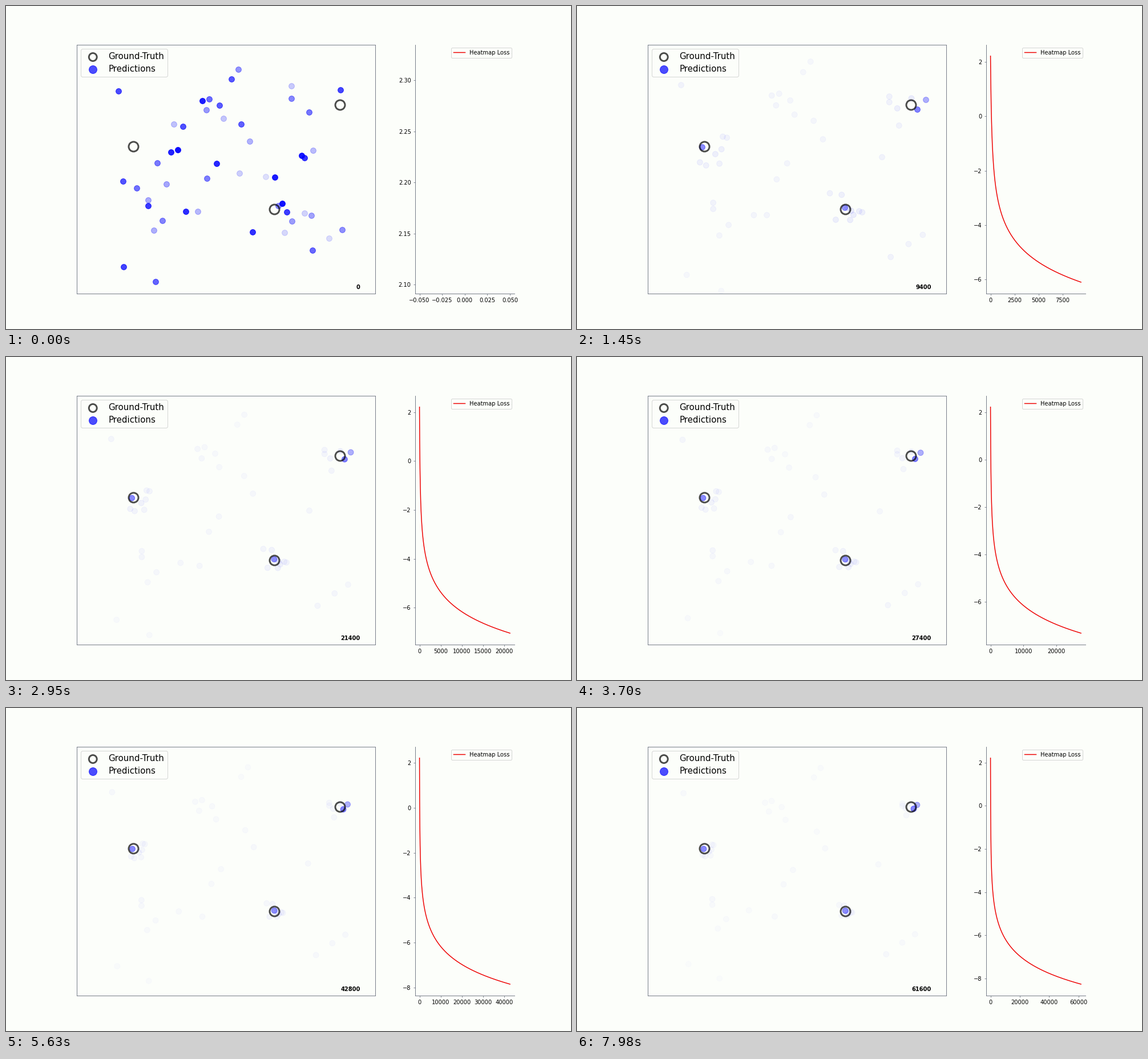
These frames come from a looping animation (990x566 px, 8 s). A matplotlib script:

```python
import numpy as np
import matplotlib.pyplot as plt
from matplotlib.animation import FuncAnimation

W, H = 990, 566
FRAMES, INTERVAL = 320, 25
PT = 0.982                      # one design point in pixels
PAPER, SPINE = "#fcfefa", "#6a707e"
MID, LAST = 9400, 61600         # training steps of the two later key poses

plt.rcParams.update({
    "font.family": "DejaVu Sans",
    "font.size": 10 * PT,
    "figure.facecolor": PAPER,
    "axes.facecolor": PAPER,
    "axes.edgecolor": SPINE,
    "axes.linewidth": 0.9,
    "xtick.major.size": 3.5 * PT,
    "ytick.major.size": 3.5 * PT,
    "xtick.color": SPINE,
    "ytick.color": SPINE,
    "xtick.labelcolor": "black",
    "ytick.labelcolor": "black",
})

GOALS = np.array([(223, 246), (470, 356), (585, 173)], float)
CENTRE = np.array([385, 286], float)

# Starting points, from the most to the least opaque dot.
START = np.array([
    (301, 252), (484, 346), (518, 262), (471, 300), (344, 166), (289, 256),
    (369, 276), (315, 360), (432, 396), (523, 266), (249, 350), (492, 361),
    (206, 457), (586, 147), (197, 149), (310, 211), (205, 307), (395, 128),
    (374, 174), (412, 207), (262, 483), (537, 428), (356, 163), (229, 319),
    (531, 186), (265, 275), (352, 302), (274, 376), (500, 162), (477, 350),
    (589, 392), (407, 111), (351, 182), (501, 377), (535, 367), (281, 312),
    (249, 340), (259, 393), (427, 237), (336, 360), (538, 253), (294, 207),
    (381, 197), (500, 140), (409, 293), (523, 363), (488, 397), (566, 407),
    (455, 299)], float)

# The first dots win their goal: goal index, offset from it, opacity.
WINNERS = [(0, (-4, 1), 0.45), (1, (-1, -3), 0.40),
           (2, (11, 8), 0.48), (2, (26, -9), 0.31)]


def key_poses():
    """x, y, opacity of every dot at the start, at MID and at LAST."""
    gap = np.linalg.norm(START[:, None] - GOALS, axis=2)
    goal = GOALS[gap.argmin(axis=1)]
    dist = gap.min(axis=1)[:, None]
    stray = dist > 95

    # Strays drift outwards, the others close in on the nearest goal.
    mid = np.where(stray, START + 0.08 * (START - CENTRE),
                   goal + 0.45 * (START - goal))
    mid_alpha = 0.02 + 0.07 * np.exp(-dist / 90)
    end_alpha = 0.5 * mid_alpha
    for i, (g, offset, alpha) in enumerate(WINNERS):
        goal[i], stray[i] = GOALS[g], False
        mid[i] = goal[i] + offset
        mid_alpha[i] = end_alpha[i] = alpha
    end = goal + np.where(stray, 0.9, 0.4) * (mid - goal)

    alpha = np.linspace(0.95, 0.12, len(START))[:, None]
    return (np.hstack([START, alpha]), np.hstack([mid, mid_alpha]),
            np.hstack([end, end_alpha]))


FIRST, MIDDLE, FINAL = key_poses()


def step_at(i):
    return 20 * i if i <= 12 else 200 * (i - 11)


def loss(t):
    s = np.log1p(t / 150)
    return -1.312 - 1.155 * s + 3.525 * np.exp(-1.3 * s)


def dots_at(t):
    """Dots travel evenly in the logarithm of the training step."""
    if t < MID:
        v = np.log1p(t / 300) / np.log1p(MID / 300)
        return FIRST + (MIDDLE - FIRST) * v
    u = np.log(t / MID) / np.log(LAST / MID)
    return MIDDLE + (FINAL - MIDDLE) * (u + 0.15 * u * (1 - u))


def blues(alpha):
    rgba = np.zeros((len(alpha), 4))
    rgba[:, 2], rgba[:, 3] = 1, alpha
    return rgba


fig, (ax, lx) = plt.subplots(
    1, 2, figsize=(W / 72, H / 72), dpi=72,
    gridspec_kw={"width_ratios": [3, 1]})

# The left axes count stage pixels by their centres, y downwards.
box = ax.get_position()
ax.set(xlim=(box.x0 * W - 0.5, box.x1 * W - 0.5),
       ylim=((1 - box.y0) * H - 0.5, (1 - box.y1) * H - 0.5),
       xticks=[], yticks=[])

ring = dict(facecolors="none", edgecolors="black", alpha=0.7,
            linewidths=3 * PT)
dot = dict(color="blue", linewidths=PT)
dots = ax.scatter(*START.T, s=100 * PT**2, zorder=2, **dot)
ax.scatter(*GOALS.T, s=300 * PT**2, zorder=3, **ring)
samples = [ax.scatter([], [], s=200 * PT**2, **ring),
           ax.scatter([], [], s=200 * PT**2, alpha=0.7, **dot)]
ax.legend(samples, ["Ground-Truth", "Predictions"], loc="upper left",
          fontsize=15, labelspacing=0.45).set_zorder(4)
counter = ax.text(620.2, 495, "0", ha="right", va="baseline", weight="bold")

curve, = lx.plot([0], [loss(0)], color="#ee0000", lw=1.5 * PT,
                 label="Heatmap Loss")
lx.spines[["top", "right"]].set_visible(False)
lx.legend(loc="upper right")


def update(i):
    t = step_at(i)
    x, y, alpha = dots_at(t).T
    dots.set_offsets(np.column_stack([x, y]))
    rgba = blues(alpha)
    dots.set_facecolors(rgba)
    dots.set_edgecolors(rgba)
    counter.set_text(str(t))

    ts = t * np.linspace(0, 1, 160) ** 3 if t else np.zeros(1)
    curve.set_data(ts, loss(ts))
    lx.relim()
    lx.autoscale_view()
    return dots, counter, curve


anim = FuncAnimation(fig, update, frames=FRAMES, interval=INTERVAL,
                     repeat=True, repeat_delay=0)
plt.show()
```
